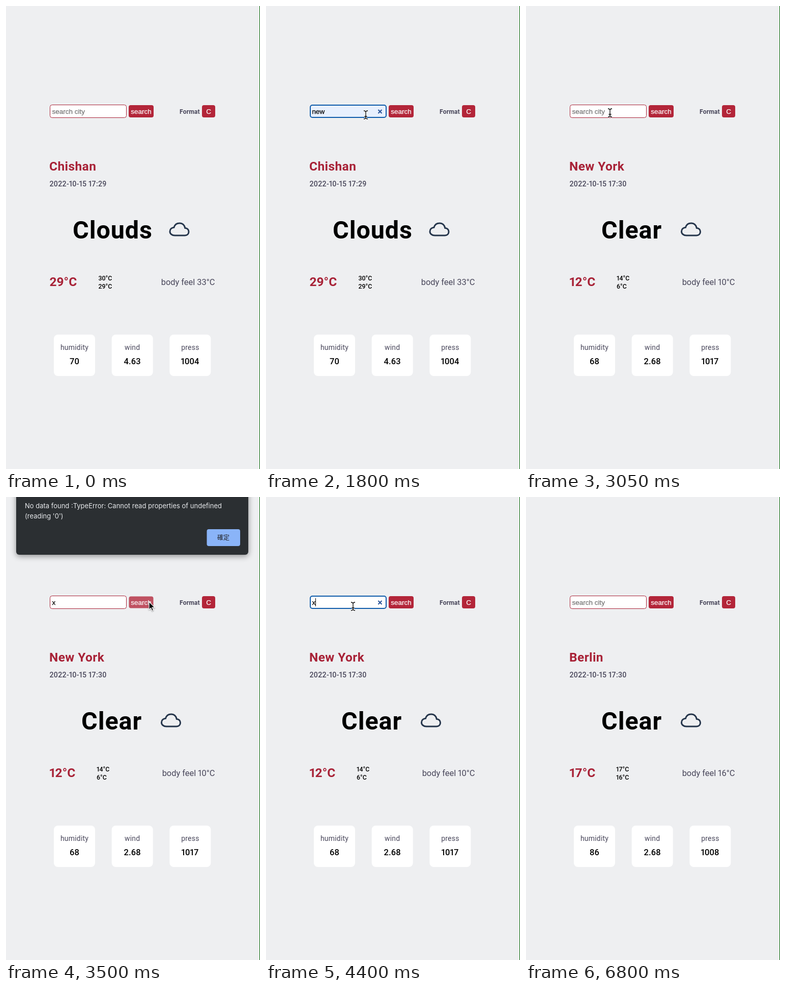
An HTML page that plays this animation: 499x906 px, repeating every 7110 ms.

```html
<!DOCTYPE html>
<html lang="en">
<head>
<meta charset="utf-8">
<style>
  html, body { margin: 0; width: 100%; height: 100%; overflow: hidden; background: #eeeff1; }
  svg { display: block; font-family: Roboto, sans-serif; }
  text { white-space: pre; }
  .control { font: 13.5px "Liberation Sans", Arial, sans-serif; stroke-width: .25px; }
  .dialog { font: 13px Inter, sans-serif; fill: #e8eaed; }
</style>
</head>
<body>
<svg id="stage" width="499" height="906" viewBox="0 0 499 906"></svg>
<script>
const LOOP = 7110, STEP = 50;
const RED = '#b32539', DARK_RED = '#a82237', GREY = '#48465a';
const BOLD = 'font-weight="700"', MEDIUM = 'font-weight="500"';
const stage = document.getElementById('stage');
const ruler = document.createElement('canvas').getContext('2d');
ruler.font = '13.5px "Liberation Sans", Arial, sans-serif';

const reports = {
  chishan: { city: 'Chishan', time: '17:29', sky: 'Clouds', skyX: 131, iconX: 320,
    temp: 29, high: 30, low: 29, rangeX: 181.5, feel: 33, stats: ['70', '4.63', '1004'] },
  newYork: { city: 'New York', time: '17:30', sky: 'Clear', skyX: 148, iconX: 303.5,
    temp: 12, high: 14, low: 6, rangeX: 178, feel: 10, stats: ['68', '2.68', '1017'] },
  berlin: { city: 'Berlin', time: '17:30', sky: 'Clear', skyX: 148, iconX: 303.5,
    temp: 17, high: 17, low: 16, rangeX: 177, feel: 16, stats: ['86', '2.68', '1008'] }
};

// Each entry changes part of the state from its time (ms) onwards.
const events = [
  [0, { report: 'chishan', unit: 'C', query: '', focus: false, caret: false, filled: false, pointer: false, alert: 0 }],
  [50, { pointer: true }],
  [400, { unit: 'F' }],
  [750, { unit: 'C' }],
  [1100, { focus: true, caret: true }],
  [1250, { caret: false }],
  [1400, { query: 'n', caret: true, pointer: false }],
  [1450, { query: 'ne' }],
  [1550, { query: 'new' }],
  [1700, { filled: true, caret: false, pointer: true }],
  [2050, { filled: false, caret: true, pointer: false }],
  [2100, { query: 'new ' }],
  [2150, { query: 'new y' }],
  [2200, { query: 'new yo' }],
  [2350, { query: 'new yor' }],
  [2400, { query: 'new york' }],
  [2450, { pointer: true }],
  [2700, { focus: false, caret: false }],
  [2750, { report: 'newYork', query: '' }],
  [3100, { focus: true, caret: true }],
  [3200, { query: 'x', pointer: false }],
  [3250, { pointer: true }],
  [3400, { focus: false, caret: false }],
  [3450, { alert: 0.5 }],
  [3500, { alert: 1 }],
  [3950, { alert: 0 }],
  [4300, { focus: true, caret: true }],
  [4600, { query: '', pointer: false }],
  [4700, { query: 'b' }],
  [4750, { query: 'be' }],
  [4900, { query: 'ber' }],
  [4950, { query: 'berl' }],
  [5000, { query: 'berli' }],
  [5100, { query: 'berlin' }],
  [5200, { pointer: true }],
  [5600, { focus: false, caret: false }],
  [5700, { report: 'berlin', query: '' }],
  [6800, { pointer: false }]
];

// Pointer stops: time, x, y.
const path = [
  [50, 116, 650], [200, 405, 203], [850, 405, 203], [1050, 181, 204], [1650, 181, 204],
  [1800, 196, 213], [2400, 196, 213], [2600, 278, 206], [2850, 278, 206], [3050, 165, 209],
  [3250, 165, 209], [3400, 281, 205], [3650, 281, 205], [3850, 430, 82], [4000, 430, 82],
  [4250, 171, 214], [5150, 171, 214], [5400, 278, 210], [6550, 278, 210], [6800, 72, 82]
];

function stateAt(t) {
  return Object.assign({}, ...events.filter(([start]) => start <= t).map(([, change]) => change));
}

function pointerAt(t) {
  const next = path.findIndex(([time]) => time >= t);
  if (next < 1) return path[next < 0 ? path.length - 1 : 0].slice(1);
  const [t0, x0, y0] = path[next - 1], [t1, x1, y1] = path[next];
  const p = (t - t0) / (t1 - t0), eased = p * p * (3 - 2 * p);
  return [x0 + (x1 - x0) * eased, y0 + (y1 - y0) * eased];
}

const within = ([x, y], left, right) => x >= left && x <= right && y >= 193 && y <= 219;
const rect = (x, y, w, h, r, fill, extra = '') =>
  `<rect x="${x}" y="${y}" width="${w}" height="${h}" rx="${r}" fill="${fill}" ${extra}/>`;
const text = (content, x, y, size, fill, extra = '') =>
  `<text x="${x}" y="${y}" font-size="${size}" fill="${fill}" ${extra}>${content}</text>`;
// The digit 1 is set narrower than the other digits.
const figures = (content, ...style) =>
  text(content.replace(/1/g, '<tspan dx="-.05em" letter-spacing="-.07em">1</tspan>'), ...style);
const control = (content, x, fill, anchor = 'start') =>
  `<text class="control" x="${x}" y="210.5" fill="${fill}" stroke="${fill}" text-anchor="${anchor}">${content}</text>`;
const line = (d, colour, width, extra = '') =>
  `<path d="${d}" fill="none" stroke="${colour}" stroke-width="${width}" ${extra}/>`;

function button(label, x, w, hover) {
  const inset = hover ? 0.5 : 0;
  return `<g opacity="${hover ? 0.78 : 1}">` +
    rect(x + inset, 194 + inset, w - 2 * inset, 24 - 2 * inset, 4, RED) +
    control(label, x + w / 2, '#fff', 'middle') + '</g>';
}

function searchField({ query, focus, caret, filled }) {
  const inset = focus ? 1 : 0.5;
  const border = focus ? 'stroke="#0f5cab" stroke-width="2"' : `stroke="${DARK_RED}"`;
  const caretX = Math.round(90.5 + ruler.measureText(query).width);
  return rect(86 + inset, 193 + inset, 151 - 2 * inset, 26 - 2 * inset, 4, filled ? '#e8f0fe' : '#fff', border) +
    control(query || 'search city', 90.5, query ? '#000' : '#757575') +
    (focus && query ? line('M220.5 203l7 7m0-7l-7 7', '#2d579b', 2.2) : '') +
    (caret ? rect(caretX, 198, 1, 16, 0, '#000') : '');
}

function weather(r, unit) {
  const degrees = c => (unit === 'F' ? Math.round(c * 1.8 + 32) : c) + '°' + unit;
  const cards = ['humidity', 'wind', 'press'].map((label, i) => {
    const x = 94 + i * 113.7, middle = x + 40.5;
    return rect(x, 643, 81, 81, 8, '#fff') +
      text(label, middle, 672.5, 14, GREY, 'text-anchor="middle" letter-spacing=".2"') +
      figures(r.stats[i], middle, 701, 16.5, '#000', MEDIUM + ' text-anchor="middle" letter-spacing=".1"');
  });
  const cloud = 'M31.5 26H11.5C6 26 2 22.6 2 18.2C2 13.6 5.5 10.8 10 10.3C11.5 5 15.5 2 21 2' +
    'C26.8 2 31 6 31.8 11.5C36 11.8 39 14.6 39 18.8C39 23 36 26 31.5 26Z';
  return text(r.city, 85, 322, 24.5, DARK_RED, BOLD + ' letter-spacing=".4"') +
    figures('2022-10-15 ' + r.time, 85.5, 352.5, 14.2, GREY, MEDIUM + ' letter-spacing=".3"') +
    text(r.sky, r.skyX, 455, 48.5, '#000', BOLD + ' letter-spacing=".9"') +
    line(cloud, '#26364c', 3, `transform="translate(${r.iconX} 423)"`) +
    figures(degrees(r.temp), 85.5, 548, 24.5, DARK_RED, BOLD) +
    figures(degrees(r.high), r.rangeX, 537, 12.4, '#000', MEDIUM) +
    figures(degrees(r.low), r.rangeX, 552.5, 12.4, '#000', MEDIUM) +
    figures('body feel ' + degrees(r.feel), 410.5, 546, 16.4, GREY, 'text-anchor="end"') +
    cards.join('');
}

function dialog(opacity) {
  return `<g opacity="${opacity}">` +
    rect(20, -20, 456, 133, 6, '#2b2f32', 'style="filter:drop-shadow(0 3px 6px #0006)"') +
    '<text class="dialog" x="37" y="21.5">No data found :TypeError: Cannot read properties of undefined</text>' +
    `<text class="dialog" x="37" y="41.5">(reading '0')</text>` +
    rect(394.5, 63, 65.5, 33, 4, '#8ab4f8') +
    text('確定', 427, 84, 12, '#202124',
      MEDIUM + ` text-anchor="middle" font-family="'Noto Sans CJK TC', 'Noto Sans CJK', sans-serif"`) +
    '</g>';
}

function pointer([x, y], beam) {
  const bar = 'M-4-8Q0-8 0-5Q0-8 4-8M0-5V5M-4 8Q0 8 0 5Q0 8 4 8M-2.5 3H2.5';
  const arrow = '<path d="M0 0V15.5L3.6 12.2L6 17.8L8.6 16.7L6.2 11.2H11.2Z" stroke="#fff" ' +
    'stroke-width="1.2" style="filter:drop-shadow(0 1px 1px #0006)"/>';
  return `<g transform="translate(${x} ${y})">` +
    (beam ? line(bar, '#fff', 3) + line(bar, '#000', 1.3) : arrow) + '</g>';
}

function draw(t) {
  const state = stateAt(t), at = pointerAt(t);
  const over = (left, right) => state.pointer && within(at, left, right);
  stage.innerHTML =
    rect(0, 0, 499, 906, 0, '#eeeff1') +
    rect(498, 0, 1, 906, 0, '#006400') +
    searchField(state) +
    button('search', 241, 49, over(241, 290)) +
    text('Format', 341, 210.5, 12.2, GREY, BOLD + ' letter-spacing=".1"') +
    button(state.unit, 385, 26, over(385, 411)) +
    weather(reports[state.report], state.unit) +
    (state.alert ? dialog(state.alert) : '') +
    (state.pointer ? pointer(at, within(at, 86, 237)) : '');
}

let shown = -1;
function tick() {
  const t = Math.floor(performance.now() % LOOP / STEP) * STEP;
  if (t !== shown) draw(shown = t);
  requestAnimationFrame(tick);
}
tick();
</script>
</body>
</html>
```
